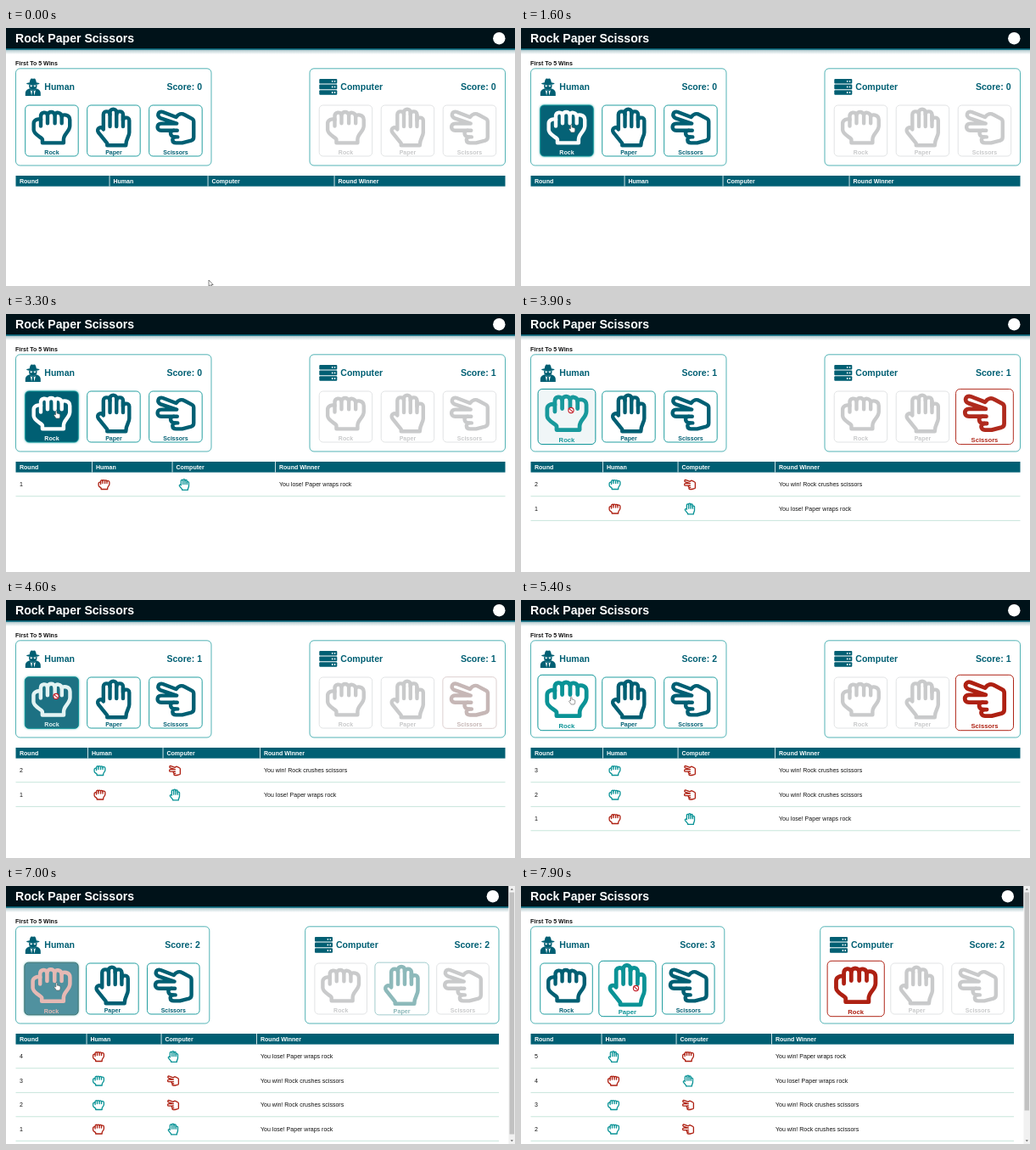
These frames come from a looping animation (600 by 304 pixels, 8000 ms). An HTML page:

```html
<!DOCTYPE html>
<html lang="en">
<head>
<meta charset="utf-8">
<title>Rock Paper Scissors</title>
<style>
  html, body { margin: 0; width: 100%; height: 100%; overflow: hidden; background: #fff; }
  svg { display: block; width: 600px; height: 304px; font-family: Arial, "Liberation Sans", sans-serif; font-size: 7.04px; }
  .b { font-weight: 700; }
  .h { font-weight: 700; font-size: 10.56px; fill: #005f73; }
  .end { text-anchor: end; }
  .mid { text-anchor: middle; }
  .icon { fill: none; stroke: currentColor; stroke-width: 48; stroke-linejoin: round; stroke-linecap: round; }
  .panel { fill: #fff; stroke: #0a9396; stroke-width: .7; }
</style>
</head>
<body>
<svg viewBox="0 0 600 304">
  <defs>
    <linearGradient id="shade" x2="0" y2="1">
      <stop stop-color="#5e8f99" stop-opacity=".55"/>
      <stop offset="1" stop-color="#5e8f99" stop-opacity="0"/>
    </linearGradient>
    <filter id="blur" x="-20%" y="-20%" width="140%" height="140%"><feGaussianBlur stdDeviation="1.4"/></filter>
    <g id="rock" class="icon" transform="translate(-256 -256)">
      <path d="M136 456V412C136 390 24 352 24 290V206C24 164 84 136 115 162V116C115 56 190 50 202 100C206 46 290 46 296 100C300 54 378 58 384 116C392 82 488 90 488 160V236C488 310 408 340 408 412V456Z"/>
      <path d="M115 150V240M202 100V205M296 100V205M384 112V205"/>
    </g>
    <g id="paper" class="icon" transform="translate(-256 -256)">
      <path d="M172 488V462L60 322C28 272 90 236 124 282V92C124 40 208 40 208 92V68C208 8 292 8 292 68V92C292 40 376 40 376 92V168C376 120 456 120 456 168V320C456 380 412 400 412 488Z"/>
      <path d="M208 90V245M292 70V245M376 104V245"/>
    </g>
    <g id="scissors" class="icon" transform="translate(-256 -256)">
      <path d="M270 208L66 140C4 116 32 40 92 60L262 126C290 84 334 72 372 96L466 146Q488 158 488 184V382Q488 416 456 426L340 456H260C204 456 204 384 250 380C176 384 176 296 232 296H70C8 296 8 208 70 208Z"/>
      <path d="M250 380H282M232 296H276"/>
    </g>
    <g id="spy" fill="#005f73">
      <path d="M4.8 6C5.3 2 6.3 0 7.8.5Q9 1.1 10.2.5C11.7 0 12.7 2 13.2 6Z"/>
      <ellipse cx="9" cy="6.5" rx="7.8" ry="1.4"/>
      <path d="M4.3 7.5H13.7V9.5C13.7 12.4 11.5 14 9 14S4.3 12.4 4.3 9.5Z"/>
      <path d="M0 21V18Q0 14.4 3.4 13L5 12.2 9 14.5 13 12.2 14.6 13Q18 14.4 18 18V21Z"/>
      <path fill="#fff" d="M5.4 8.6H8.4Q8.2 10.4 6.9 10.4T5.4 8.6ZM9.6 8.6H12.6Q12.4 10.4 11.1 10.4T9.6 8.6ZM6 14.2L8.2 15.4 7.3 20.6ZM12 14.2L9.8 15.4 10.7 20.6Z"/>
    </g>
    <g id="server">
      <path fill="#005f73" d="M1 0H20a1 1 0 0 1 1 1V4.6a1 1 0 0 1-1 1H1a1 1 0 0 1-1-1V1a1 1 0 0 1 1-1Z"/>
      <circle cx="15.4" cy="2.8" r=".9" fill="#fff"/><circle cx="18.3" cy="2.8" r=".9" fill="#fff"/>
    </g>
  </defs>
  <g id="page"></g>
  <g id="cards"></g>
  <g id="pointer">
    <path fill="#fff" stroke="#333" stroke-width=".6" d="M0 0V7.4L1.7 5.9 2.9 8.3 4 7.8 2.9 5.5H5.2Z"/>
    <path fill="#fff" stroke="#555" stroke-width=".6" d="M-1.5 1V-3.4Q-.8-4.7 0-3.4V-.8Q1-1.4 1.4-.5 2.4-.9 2.7 0 3.6-.2 3.7.8V2.5Q3.6 4 2.8 5H-.9L-3.4 1.4Q-3-.1-1.5 1Z"/>
    <path fill="#fff" stroke="#c4202a" stroke-width="1.1" d="M-3.1 0A3.1 3.1 0 1 1 3.1 0A3.1 3.1 0 1 1-3.1 0ZM-2.2-2.2L2.2 2.2"/>
  </g>
</svg>
<script>
const LOOP = 8000, FADE = 500, HOLD = 750;
const NAMES = ['Rock', 'Paper', 'Scissors'];
const BEATS = ['Rock crushes scissors', 'Paper wraps rock', 'Scissors cut paper'];
const DARK = [0, 95, 115], TEAL = [10, 147, 150], RED = [174, 32, 18], WHITE = [255, 255, 255];
const GREY = [201, 202, 203], PALE = [222, 224, 225];

// click time, human's choice, computer's choice
const ROUNDS = [[1970, 0, 1], [3550, 0, 2], [4780, 0, 2], [6050, 0, 1], [7350, 1, 0]]
  .map(([at, me, cpu]) => ({ at, me, cpu, win: (me - cpu + 3) % 3 === 1 }));
const HOVER = [[1190, 7070], [7130, LOOP], [LOOP, LOOP]];
const PATH = [[0, 239, 297], [40, 239, 297], [200, 74, 242], [950, 74, 242], [1250, 60, 118],
  [3550, 60, 118], [3650, 59, 113.5], [4700, 59, 113.5], [4760, 60, 118], [7000, 60, 118],
  [7200, 134, 119], [7400, 135.5, 120.5], [LOOP, 135.5, 120.5]];
const POINTERS = [[0, 0], [1190, 1], [3600, 2], [4720, 1], [7450, 2]];
const COLUMNS = [[122, 238, 387], [101.5, 196, 317.5], [96.5, 185, 299.5], [96.5, 185, 299.5],
  [95, 183, 295.5], [95, 183, 295.5]];

const $ = id => document.getElementById(id);
const rgb = c => `rgb(${c.map(Math.round)})`;
const mix = (a, b, k) => a.map((v, i) => v + (b[i] - v) * k);
const bez = (a, b, u) => 3 * a * u * (1 - u) ** 2 + 3 * b * u * u * (1 - u) + u ** 3;

// cubic-bezier(.25, .1, .25, 1)
function ease(x) {
  if (x <= 0) return 0;
  if (x >= 1) return 1;
  let lo = 0, hi = 1;
  for (let i = 0; i < 20; i++) {
    const m = (lo + hi) / 2;
    if (bez(.25, .25, m) < x) lo = m; else hi = m;
  }
  return bez(.1, 1, lo);
}
const pulse = (t, on, off) => ease((t - on) / FADE) * (1 - ease((t - off) / FADE));

const text = (x, y, s, cls = '', fill = '#111') => `<text x="${x}" y="${y}" class="${cls}" fill="${fill}">${s}</text>`;
const rect = (x, y, w, h, attrs) => `<rect x="${x}" y="${y}" width="${w}" height="${h}" ${attrs}/>`;
const icon = (kind, size, x, y, attrs = '') =>
  `<g transform="translate(${x} ${y}) scale(${size / 512})" ${attrs}><use href="#${NAMES[kind].toLowerCase()}"/></g>`;

function layout(n) {
  const bar = n > 3, width = bar ? 592.5 : 600, right = width - 11.5;
  const panel = bar ? 228.3 : 230.5;
  return { bar, width, right, panel, left: [11.5, right - panel], card: bar ? 61.6 : 62.5, step: bar ? 71.9 : 73 };
}

function table(n, right) {
  const cols = [11.5, ...COLUMNS[n]];
  let out = rect(11.5, 174, right - 11.5, 12.6, 'fill="#005f73"');
  ['Round', 'Human', 'Computer', 'Round Winner'].forEach((s, i) => {
    if (i) out += rect(cols[i] - .4, 174, .9, 12.6, 'fill="#e8f1f2"');
    out += text(cols[i] + 4.5, 182.6, s, 'b', '#fff');
  });
  ROUNDS.slice(0, n).reverse().forEach((r, i) => {
    const y = 200.7 + 28.5 * i;
    const tint = won => `color="${rgb(won ? TEAL : RED)}"`;
    out += text(16, y + 2.5, n - i)
      + icon(r.me, 14.1, cols[1] + 14, y + .3, tint(r.win))
      + icon(r.cpu, 14.1, cols[2] + 14, y + .3, tint(!r.win))
      + text(cols[3] + 4.5, y + 2.5, `You ${r.win ? 'win' : 'lose'}! ${BEATS[r.win ? r.me : r.cpu]}`)
      + rect(11.5, y + 13.7, right - 11.5, .8, 'fill="#b9dfd2"');
  });
  return out;
}

function drawPage(n) {
  const { bar, width, right, panel, left } = layout(n);
  const wins = ROUNDS.slice(0, n).filter(r => r.win).length;
  let out = rect(0, 25, width, 6, 'fill="url(#shade)"')
    + rect(0, 0, width, 24.2, 'fill="#001219"')
    + rect(0, 24, width, 1.7, 'fill="#005f73"')
    + `<text x="11" y="16.6" fill="#fff" font-weight="700" font-size="14.08">Rock Paper Scissors</text>`
    + `<circle cx="${right - 7.2}" cy="12.2" r="7.2" fill="#fff"/>`
    + text(11, 43.8, 'First To 5 Wins', 'b');
  left.forEach((x, side) => {
    out += rect(x, 47.8, panel, 114.2, 'rx="5" class="panel"')
      + text(x + (side ? 36.3 : 33.8), 73.1, side ? 'Computer' : 'Human', 'h')
      + text(x + panel - 11, 73.1, `Score: ${side ? n - wins : wins}`, 'h end');
  });
  out += '<use href="#spy" x="22.8" y="59"/>';
  for (let i = 0; i < 3; i++) out += `<use href="#server" x="${left[1] + 11.3}" y="${60 + i * 6.6}"/>`;
  out += table(n, right);
  if (bar) {
    out += rect(width, 0, 7.5, 304, 'fill="#f1f1f1"')
      + rect(width + 1, 7.5, 5.6, n > 4 ? 257 : 285, 'fill="#c1c1c1"')
      + `<path fill="#666" d="M${width + 2.2} 4.8l1.6-2 1.6 2zM${width + 2.2} 299.2l1.6 2 1.6-2z"/>`;
  }
  $('page').innerHTML = out;
}

const cards = [0, 1].flatMap(side => NAMES.map((name, kind) => {
  const g = document.createElementNS('http://www.w3.org/2000/svg', 'g');
  g.innerHTML = rect(0, -30, 0, 60, 'rx="4.5" fill="#0a9396" filter="url(#blur)"')
    + rect(0, -30, 0, 60, 'rx="4.5" stroke-width=".9"')
    + icon(kind, 47, 0, -4)
    + text(0, 27.9, name, 'b mid', 'currentColor');
  $('cards').append(g);
  return { g, side, kind, glow: g.children[0], box: g.children[1] };
}));

function drawCards(t, n) {
  const { left, card, step } = layout(n), now = ROUNDS[n - 1];
  for (const { g, side, kind, glow, box } of cards) {
    const chosen = now && (side ? now.cpu : now.me) === kind;
    const lit = chosen ? pulse(t, now.at, now.at + HOLD) : 0;
    const hover = side ? 0 : pulse(t, ...HOVER[kind]);
    const mark = now && now.win === !side ? TEAL : RED;
    const ink = mix(side ? GREY : mix(DARK, WHITE, hover), mark, lit);
    g.setAttribute('transform', `translate(${left[side] + 11.2 + card / 2 + kind * step} 121) scale(${1 + .09 * lit})`);
    g.setAttribute('color', rgb(ink));
    for (const r of [glow, box]) {
      r.setAttribute('x', -card / 2);
      r.setAttribute('width', card);
    }
    glow.setAttribute('opacity', hover * (1 - lit));
    box.setAttribute('fill', rgb(mix(WHITE, DARK, hover * (1 - lit))));
    box.setAttribute('stroke', rgb(mix(side ? PALE : TEAL, mark, lit)));
  }
}

function drawPointer(t) {
  const i = PATH.findIndex(p => p[0] > t), [t0, ...a] = PATH[i - 1], [t1, ...b] = PATH[i];
  const [x, y] = mix(a, b, (t - t0) / (t1 - t0));
  const shape = POINTERS.filter(p => p[0] <= t).pop()[1];
  $('pointer').setAttribute('transform', `translate(${x} ${y})`);
  [...$('pointer').children].forEach((p, k) => p.setAttribute('display', k === shape ? 'inline' : 'none'));
}

const start = performance.now();
let shown = -1;
function frame() {
  const t = (performance.now() - start) % LOOP;
  const n = ROUNDS.filter(r => r.at <= t).length;
  if (n !== shown) drawPage(shown = n);
  drawCards(t, n);
  drawPointer(t);
  requestAnimationFrame(frame);
}
frame();
</script>
</body>
</html>
```
